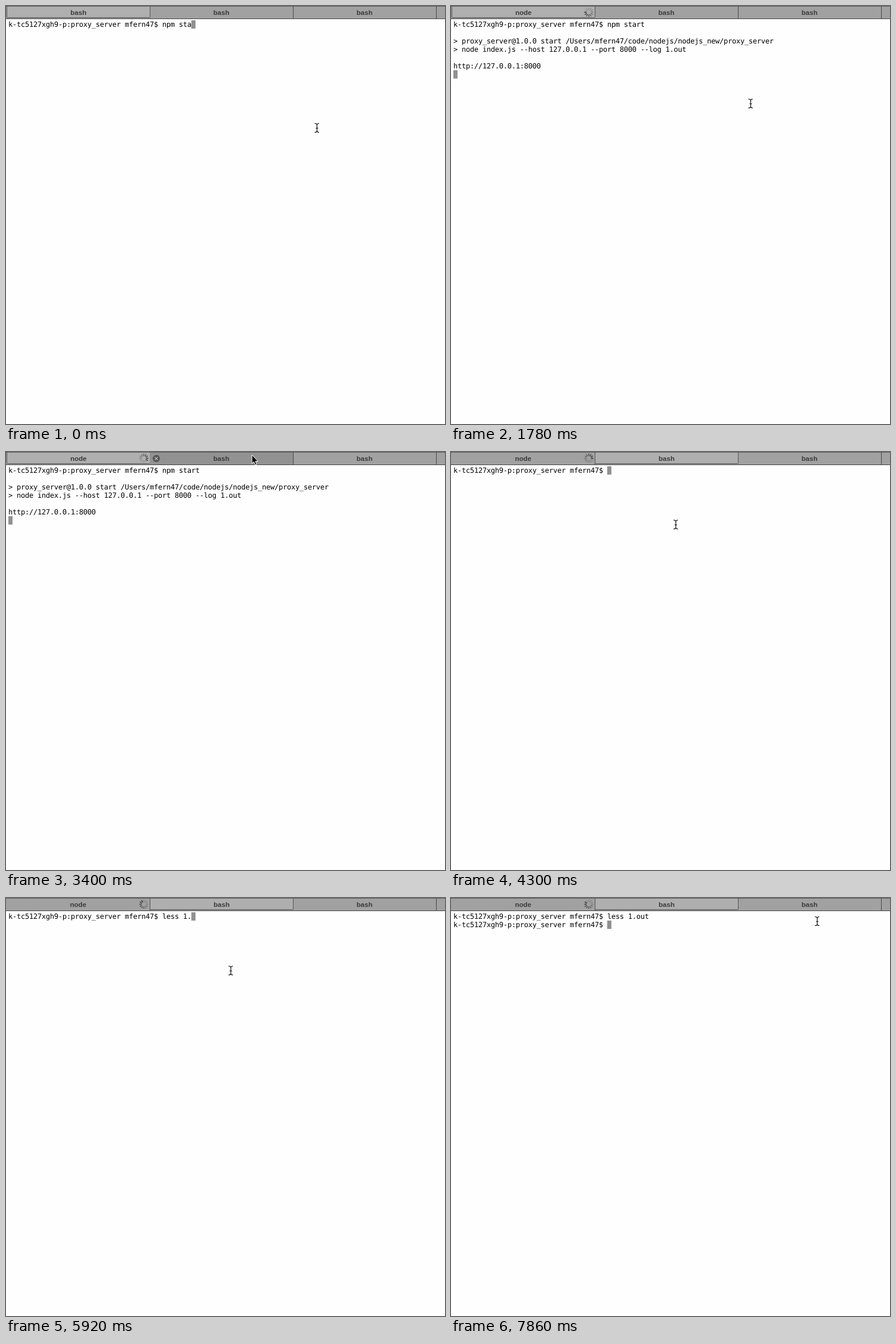
An HTML page that plays this animation: 739 by 703 pixels, repeating every 8000 ms.

```html
<!DOCTYPE html>
<html lang="en">
<head>
<meta charset="utf-8">
<title>Terminal session</title>
<style>
  html, body { margin: 0; width: 100%; height: 100%; overflow: hidden; background: #fefefe; }
  #bar {
    position: absolute; left: 0; top: 0; width: 739px; height: 22px; overflow: hidden;
    box-sizing: border-box; background: #a1a1a1;
    border-top: 1px solid #5c5c5c; border-bottom: 1px solid #424242;
  }
  .tab {
    position: absolute; top: 0; width: 242px; height: 20px; box-sizing: border-box;
    border: solid #474747; border-width: 0 1px 0 0;
    font: bold 11.5px/20px "Liberation Sans", Arial, sans-serif;
    text-align: center; color: #3a3a3a;
  }
  .tab.hover { background: #929292; }
  .tab.active {
    height: 19px; background: #afafaf;
    border-width: 0 1px 1px; border-color: #555; border-radius: 0 0 2px 2px;
  }
  pre {
    position: absolute; left: 4px; top: 24px; margin: 0;
    font: 12px/14px "DejaVu Sans Mono", monospace;
    letter-spacing: calc(7px - 1ch);
    text-rendering: geometricPrecision; color: #000;
  }
  #status { display: inline-block; height: 14px; vertical-align: top; background: #000; color: #fff; }
  #caret { display: inline-block; width: 7px; height: 14px; vertical-align: top; background: #919191; }
  svg { position: absolute; left: 0; top: 0; }
</style>
</head>
<body>
<div id="bar"></div>
<pre><b id="status"></b><span id="text"></span><i id="caret"></i></pre>
<svg width="739" height="703" fill="none">
  <g id="close">
    <circle cx="253" cy="11" r="6" fill="#555"/>
    <path d="M250.5 8.5l5 5m0-5l-5 5" stroke="#b5b5b5" stroke-width="1.4"/>
  </g>
  <g id="spinner" transform="translate(232 10.5)" stroke="#222" stroke-width="1.5" stroke-linecap="round"></g>
  <g id="mouse">
    <path id="beam" stroke="#111" stroke-width="1.2"
      d="M-3.5-7.5Q0-7.5 .5-5.5Q1-7.5 4-7.5M.5-6V6.500M-3.5 7.500Q0 7.500 .5 5.500Q1 7.500 4 7.500M-1.500 .5H2.500"/>
    <path id="arrow" fill="#000" stroke="#fff" d="M0 0V14.500L3.300 11.400L5.700 17L8.100 16L5.800 10.700H10.300Z"/>
  </g>
</svg>
<script>
  const LOOP = 8000, TICKS = 54, LEAD = 8;
  const $ = id => document.getElementById(id);

  const user = "mfern47";
  const prompt = `k-tc5127xgh9-p:proxy_server ${user}$ `;
  const run = prompt + "npm start\n";
  const launch = run +
    `\n> proxy_server@1.0.0 start /Users/${user}/code/nodejs/nodejs_new/proxy_server` +
    "\n> node index.js --host 127.0.0.1 --port 8000 --log 1.out\n\n";
  const less = prompt + "less 1.out\n";

  // Each table row: first tick, value
  const screens = [
    [0, prompt + "npm sta"], [1, prompt + "npm star"], [2, prompt + "npm start"],
    [7, run], [8, launch], [10, launch + "http://127.0.0.1:8000\n"],
    [24, prompt],
    ..."less ".split("").map((_, i) => [31 + i, prompt + "less ".slice(0, i + 1)]),
    [38, prompt + "less 1"], [39, prompt + "less 1."], [41, prompt + "less 1.o"],
    [42, prompt + "less 1.ou"], [43, prompt + "less 1.out"],
    [45, ""], [50, less + prompt]
  ];
  const path = [
    [0, [523, 205]], [11, [521, 199]], [12, [504, 164]], [13, [452, 72]],
    [14, [417, 7]], [15, [414, 5]], [26, [408, 30]], [27, [390, 86]],
    [28, [380, 117]], [29, [378, 122]], [51, [402, 116]], [52, [530, 72]], [53, [616, 39]]
  ];
  const first = [[0, "bash"], [8, "node"]];
  const second = [[0, "bash"], [45, "less"], [50, "bash"]];

  const at = (rows, tick) => rows.filter(r => r[0] <= tick).pop()[1];

  const tabs = [0, 1, 2, 3].map(i => {
    const tab = document.createElement("div");
    tab.style.left = i * 241 + 1 + "px";
    $("bar").append(tab);
    return tab;
  });

  const spokes = Array.from({ length: 12 }, (_, i) => {
    const line = document.createElementNS("http://www.w3.org/2000/svg", "path");
    line.setAttribute("d", "M0-4.300V-7.200");
    line.setAttribute("transform", `rotate(${i * 30})`);
    $("spinner").append(line);
    return line;
  });

  const show = (id, on) => { $(id).style.display = on ? "" : "none"; };

  function draw(tick) {
    const [x, y] = at(path, tick);
    const inTab = y < 22;
    const active = tick < 24 ? 0 : 1;
    const paging = tick >= 45 && tick < 50;
    const labels = [at(first, tick), at(second, tick), "bash", ""];

    tabs.forEach((tab, i) => {
      tab.textContent = labels[i];
      tab.className = "tab" + (i === active ? " active" : inTab && i === 1 ? " hover" : "");
    });

    $("status").textContent = paging ? "1.out (END) " : "";
    $("text").textContent = at(screens, tick);

    $("mouse").setAttribute("transform", `translate(${x} ${y})`);
    show("beam", !inTab);
    show("arrow", inTab);
    show("close", inTab);
    show("spinner", tick >= 8);

    // One clockwise turn per second, fading behind the head
    const head = Math.floor(tick * LOOP / TICKS / 1000 * 12) % 12;
    spokes.forEach((line, i) => {
      const age = (head - i + 12) % 12;
      line.style.opacity = Math.max(0.2, 0.9 - age * 0.085);
    });
  }

  let last = -1;
  function frame() {
    const t = performance.now() % LOOP;
    const tick = Math.floor((t + LEAD) * TICKS / LOOP) % TICKS;
    if (tick !== last) draw(last = tick);
    requestAnimationFrame(frame);
  }
  frame();
</script>
</body>
</html>
```
